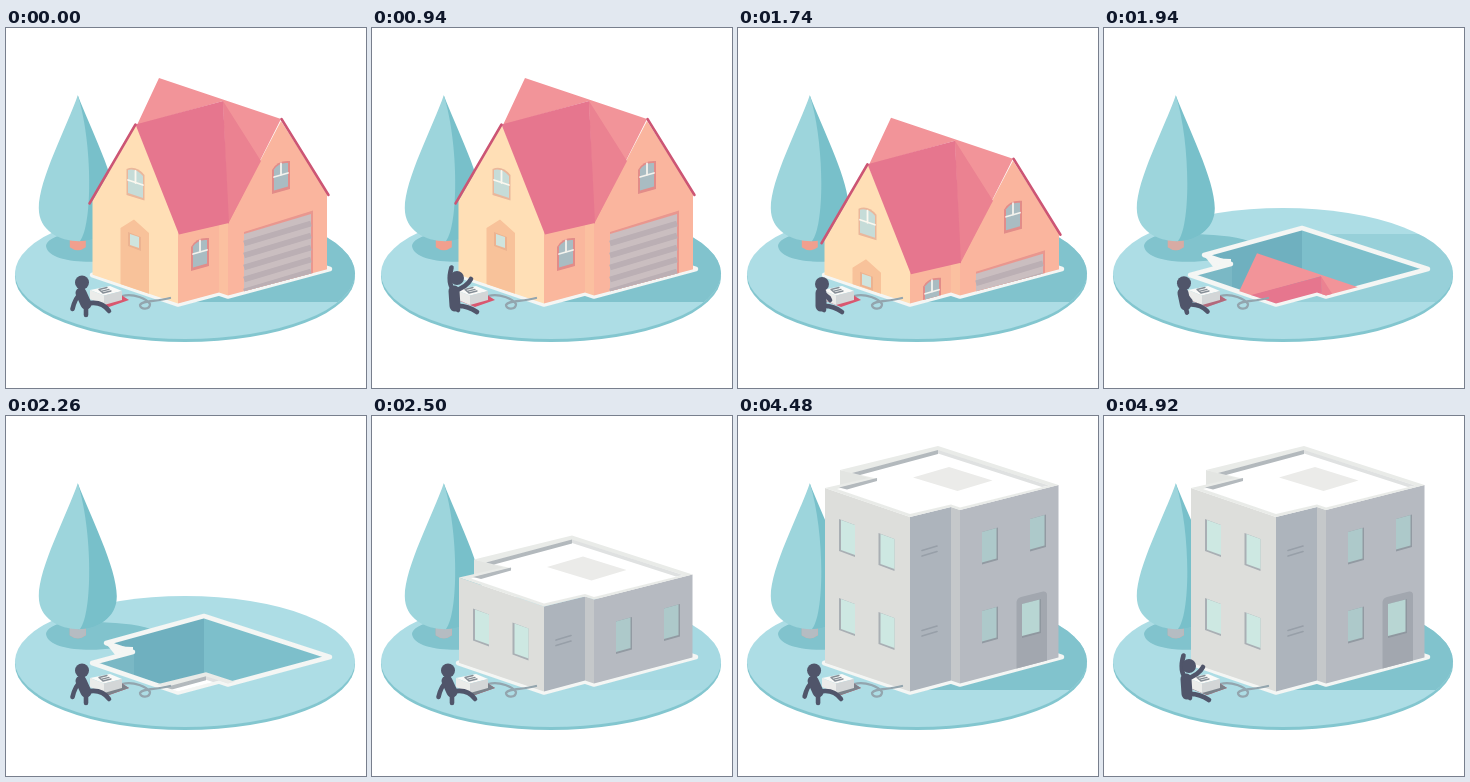
An HTML page for the animation above (5000 ms loop, 360 by 360 pixels).

```html
<!DOCTYPE html>
<html lang="en">
<head>
<meta charset="utf-8">
<style>
  html, body { margin: 0; height: 100%; overflow: hidden; background: #fff; }
  svg { display: block; width: 100vw; height: 100vh; }
  .line { fill: none; stroke-linecap: round; stroke-linejoin: round; }
</style>
</head>
<body>
<svg viewBox="0 0 360 360">
  <defs>
    <clipPath id="island"><ellipse cx="179" cy="245.500" rx="170" ry="65.500"/></clipPath>
    <clipPath id="hole"><path id="footprint" d="M86 247 127 236 100 227 198 200 324 241 222 268.500 213 265.500 172 276.500Z"/></clipPath>
    <clipPath id="above"><path d="M80 0V244.600L172 275.500 213 264.500 222 267.500 326 240V0Z"/></clipPath>
    <g id="paneLeft">
      <path fill="#a9afb4" d="M101 103 117 109V141L101 135Z"/>
      <path fill="#cde8e2" d="M103 104 117 109V139L103 134Z"/>
    </g>
    <g id="paneRight">
      <path fill="#929aa2" d="M244 116 260 111.500V144L244 148.500Z"/>
      <path fill="#adc9ca" d="M244 116 258.500 112V142.500L244 146.500Z"/>
    </g>
    <g id="vent"><path class="line" stroke="#979fa8" stroke-width="1.700" d="M184 134.500 199 130M184 140 199 135.500"/></g>
    <g id="sash">
      <path fill="#e28c89" d="M185 219Q190 209 203 210V238L185 243Z"/>
      <path fill="#a9bcc2" d="M187 218.500Q192 211 201 212V235.500L187 239.500Z"/>
      <path class="line" stroke="#f4f3ee" stroke-width="1.800" d="M194 212.500V224M187 226 201 222"/>
    </g>
  </defs>

  <ellipse cx="179" cy="248.500" rx="170" ry="65.500" fill="#83c6cf"/>
  <ellipse cx="179" cy="245.500" rx="170" ry="65.500" fill="#addde5"/>
  <path id="shadow" clip-path="url(#island)" fill="#81c3cd" d="M199 206H360V274H172Z"/>
  <path fill="#81c3cd" d="M40 218C42 208 62 204 82 206 108 206 130 208 145 213L100 226 108 232C82 236 42 234 40 218Z"/>

  <g transform="translate(.8 .3)">
    <path fill="#f19f8e" d="M63 209H79V219Q71 225 63 219Z"/>
    <path class="grey" fill="#b5bcc2" d="M63 209H79V219Q71 225 63 219Z"/>
    <path fill="#78c0ca" d="M71 67C83 99 110 151 110 180 110 202 90 213 71 213Z"/>
    <path fill="#9dd5dc" d="M71 67C60 99 32 151 32 180 32 202 52 213 73 213 86 198 86 115 71 67Z"/>
  </g>

  <g clip-path="url(#hole)">
    <path fill="#7dbfcb" d="M80 190H330V280H80Z"/>
    <path fill="#6fb0bf" d="M100 227 198 200V280H128V235Z"/>
    <path fill="#7ab8c5" d="M80 249 128 235V280H80Z"/>
  </g>
  <path fill="#f4f6f4" d="M102 230 127 231V236L110 240Z"/>
  <use href="#footprint" fill="none" stroke="#f4f6f4" stroke-width="4.500" stroke-linejoin="round"/>

  <g clip-path="url(#above)">
    <g id="house">
      <path fill="#ffdfb6" d="M130 97 86.500 173V290L172 300V200Z"/>
      <path fill="#fab79d" d="M172 203 213 194V280H172Z"/>
      <path fill="#fbc0a0" d="M213 194H222V280H213Z"/>
      <path fill="#fab59e" d="M222 194 275 93 321 165V280H222Z"/>
      <path fill="#f29499" d="M153 50 275 91 222 196 217 73 131 97Z"/>
      <path fill="#eb8291" d="M217 73 255 133 222 196Z"/>
      <path fill="#e6768e" d="M129.500 96.500 217 73 223 195 173 206.500Z"/>
      <path class="line" stroke="#cc5574" stroke-width="2.500" d="M83.500 175.500 129.500 96.500M275.500 91 322.500 167"/>
      <path fill="#f8c29a" d="M114.500 200 128 191.500 143 205V267L114.500 257Z"/>
      <path fill="#ecb391" d="M122 204 135 209V223L122 218Z"/>
      <path fill="#cfe4de" d="M124 206 133 209V220L124 217Z"/>
      <path fill="#eab79b" d="M120.500 141Q130 137 138.500 147V172.500L120.500 167Z"/>
      <path fill="#c6dcd8" d="M122 142Q130 140 137 148V170L122 165Z"/>
      <path class="line" stroke="#fbf8ef" stroke-width="1.800" d="M129.500 143V155M122 152 137 157"/>
      <use href="#sash"/>
      <use href="#sash" x="81" y="-77"/>
      <path fill="#e9978f" d="M238 204 307 182.500V250L238 270Z"/>
      <path fill="#cabec0" d="M238 206 305 186V246L238 266Z"/>
      <path fill="none" stroke="#bbafb4" stroke-width="5.500" d="M238 215.500 305 195.500M238 227.500 305 207.500M238 239.500 305 219.500M238 251.500 305 231.500M238 263.500 305 243.500"/>
    </g>

    <g id="block">
      <path fill="#e3e5e2" d="M102 54 140 62 102 73Z"/>
      <path fill="#dddedb" d="M87 72 172 101V300L87 270Z"/>
      <path fill="#adb4bc" d="M172 101 213 91V290H172Z"/>
      <path fill="#c5c8ca" d="M213 91 222 94V290H213Z"/>
      <path fill="#b6bac1" d="M222 94 320.500 69V290H222Z"/>
      <path fill="#e9ebe8" d="M87 72 131 62 102 54 200 30 320.500 69 222 94 213 91 172 101Z"/>
      <path fill="#fff" d="M99 73 140 63 115 57 200 34.500 311 69.500 222 91.500 213 88.500 172 98Z"/>
      <path fill="#b3b9bd" d="M114 57 200 34V38L122 59ZM101 71.500 139 62V65L109 73.500Z"/>
      <path fill="#dfe1e1" d="M200 34 311 69.500 304 71 200 37.500Z"/>
      <path fill="#ebebe9" d="M175 61.500 211 51 254.500 64.500 219.500 75Z"/>
      <use href="#paneLeft"/><use href="#paneLeft" x="39.500" y="14"/>
      <use href="#paneLeft" y="79"/><use href="#paneLeft" x="39.500" y="93"/>
      <use href="#paneRight"/><use href="#paneRight" x="48" y="-13"/><use href="#paneRight" y="79"/>
      <path fill="#a2a7af" d="M278.500 186Q279 182 283 181L305 175.500Q309 175 309 179V260H278.500Z"/>
      <path fill="#8f979f" d="M284 188 303 183V217L284 222Z"/>
      <path fill="#b8d6d3" d="M284 188 301.500 183.500V215.500L284 220Z"/>
      <use href="#vent"/><use href="#vent" y="80"/>
    </g>
  </g>

  <path class="line" stroke="#93a5ae" stroke-width="2.300" d="M116 268C128 265 141 271 144 276 144 282 134 282 134 277 136 272 150 274 164 270"/>
  <path fill="#d9576f" d="M88 273 115 267 123 272 103 279Z"/>
  <path class="grey" fill="#7b838b" d="M88 273 115 267 123 272 103 279Z"/>
  <path fill="#fafaf8" d="M84 262 104 258 116 263 98 267.500Z"/>
  <path fill="#ebecea" d="M84 262 98 267.500V277L84 271Z"/>
  <path fill="#d3d6d7" d="M98 267.500 116 263V272L98 277Z"/>
  <path class="line" stroke="#858e96" stroke-width="1.300" d="M93 261.500 97 265M93 261.500 101 259.500M95 263.300 103 261.300M97 265 105 263"/>

  <g class="line" stroke="#50556a">
    <path id="limbs" stroke-width="4.600"/>
    <path id="torso" stroke-width="11"/>
    <circle id="head" r="7" fill="#50556a" stroke="none"/>
  </g>
</svg>
<script>
const $ = id => document.getElementById(id);
const greys = document.querySelectorAll('.grey');

// head, neck, hip, arm (elbow, hand), arm (elbow, hand), leg (knee, foot), leg (knee, foot)
const sit   = [76,254.5, 75,265, 80,276, 69,270, 66.5,281, 78,270, 81,274, 95,272, 103,283, 80,282, 80,287];
const raise = [85,250, 82,263, 83,278, 75,255, 79.5,239.5, 95,259, 99,251, 95,277, 105,284, 84,281, 86,282];
const press = [84,256, 83,265, 83,278, 87,266, 91,270, 88,266, 92,272, 95,277, 104,284, 84,281, 86,282];

const mix = (a, b, k) => a.map((v, i) => v + (b[i] - v) * k);

function ease(t, from, to) {
  const k = Math.min(1, Math.max(0, (t - from) / (to - from)));
  return (1 - Math.cos(Math.PI * k)) / 2;
}

function pose(t) {
  let p = mix(sit, raise, ease(t, 470, 940));
  p = mix(p, press, ease(t, 1150, 1420));
  p = mix(p, sit, ease(t, 1740, 2140));
  return mix(p, raise, ease(t, 4450, 4920));
}

function drawFigure(p) {
  const at = i => p[2 * i].toFixed(2) + ' ' + p[2 * i + 1].toFixed(2);
  const limb = (root, joint) => `M${at(root)}Q${at(joint)} ${at(joint + 1)}`;
  $('limbs').setAttribute('d', limb(1, 3) + limb(1, 5) + limb(2, 7) + limb(2, 9));
  $('torso').setAttribute('d', `M${at(1)}L${at(2)}`);
  $('head').setAttribute('cx', p[0]);
  $('head').setAttribute('cy', p[1]);
}

function place(id, y, visible) {
  $(id).setAttribute('transform', `translate(0 ${y})`);
  $(id).style.display = visible ? '' : 'none';
}

function draw(now) {
  const t = now % 5000;
  place('house', 250 * ease(t, 1600, 2140), t < 2200);
  place('block', 234 - 245 * ease(t, 2200, 2740) + 11 * ease(t, 2760, 2940), t >= 2200);
  $('shadow').style.opacity = 1 - ease(t, 1740, 2140) + ease(t, 2420, 2740);
  greys.forEach(g => g.style.opacity = ease(t, 1780, 2140));
  drawFigure(pose(t));
  requestAnimationFrame(draw);
}

draw(0);
</script>
</body>
</html>
```
